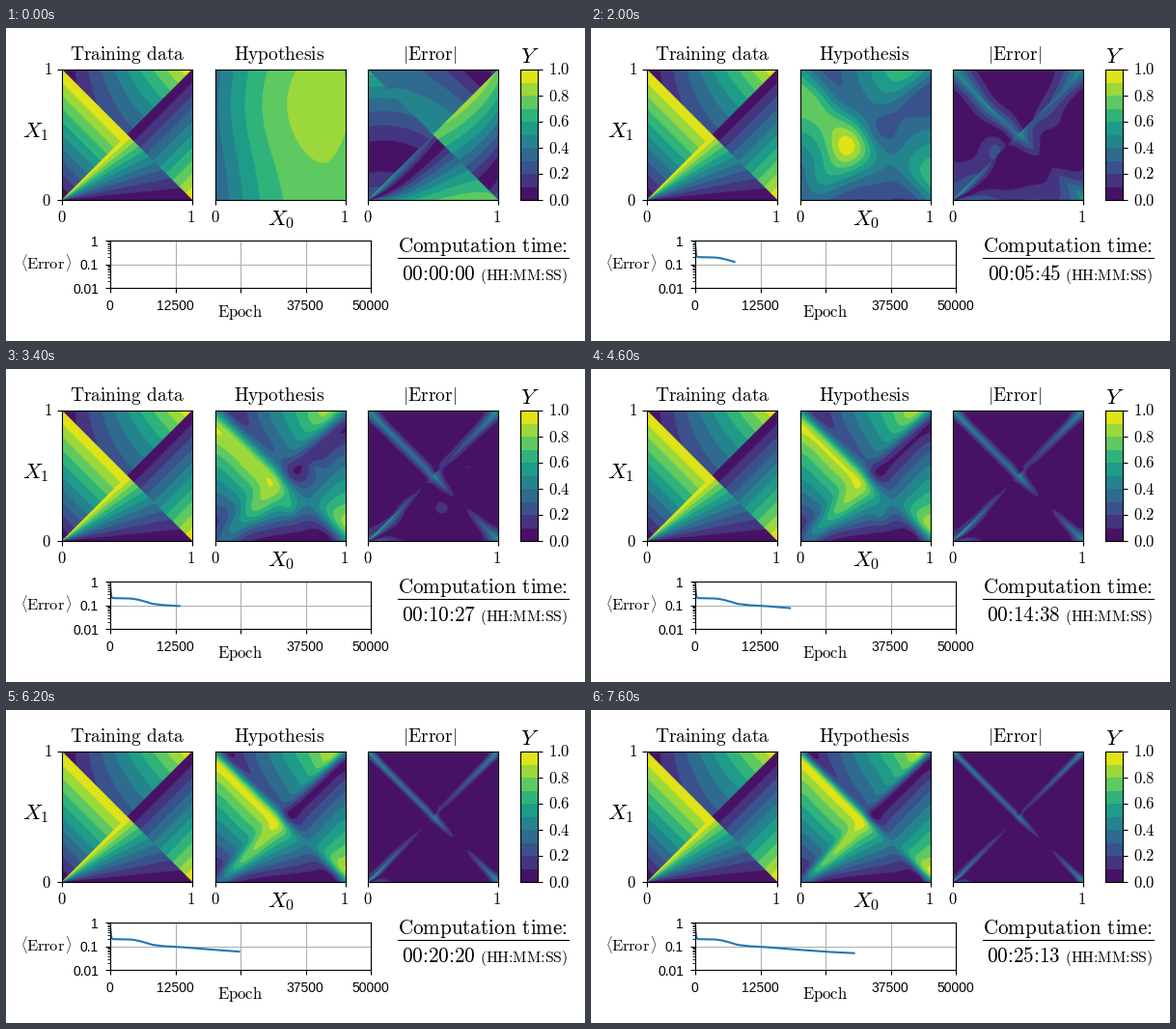
Write a matplotlib script that moves like this. It is 600x324 px and loops after 7.8 s.

```python
import numpy as np
import matplotlib.pyplot as plt
from matplotlib.animation import FuncAnimation
from matplotlib.lines import Line2D

W, H, DPI = 600, 324, 100
FRAMES, STEP = 39, 200
N = 270
SIDE = 135

plt.rcParams["mathtext.fontset"] = "cm"
plt.rcParams["font.family"] = "Liberation Sans"
fig = plt.figure(figsize=(W / DPI, H / DPI), dpi=DPI, facecolor="white")

# ---- fields on the unit square -------------------------------------------
axis = (np.arange(N) + 0.5) / N
u, v = np.meshgrid(axis, axis)
upper, far = v > u, u + v > 1
target = np.select(
    [upper & ~far, ~upper & ~far, ~upper & far],
    [u + v, v / u, u - v],
    u * v,
)


def blur(sigma):
    g = np.exp(-0.5 * ((axis[:, None] - axis) / sigma) ** 2)
    g /= g.sum(axis=1, keepdims=True)
    return g @ target @ g.T


def fit(sigma):
    """Smoothed target with a slight overshoot at the ridges."""
    return 1.5 * blur(sigma) - 0.5 * blur(1.8 * sigma)


def bump(amp, x, y, sx, sy=None):
    return amp * np.exp(-((u - x) / sx) ** 2 - ((v - y) / (sy or sx)) ** 2)


def initial_guess():
    du = u - 0.83
    slope = np.where(du > 0, 1.4, 0.7)
    return 0.855 - slope * du ** 2 - 0.1 * (1 - np.exp(-((v - 0.73) / 0.5) ** 2))


start = initial_guess()
plateau = 0.36 + bump(0.39, 0.12, 0.48, 0.42) - bump(0.12, 0.95, 0, 0.35, 0.2)
rough = (
    blur(0.085)
    + bump(0.2, 0.34, 0.40, 0.14)
    - bump(0.08, 0.28, 0.72, 0.14)
    + bump(0.09, 0.78, 0.6, 0.15)
    + bump(0.1, 0.65, 0, 0.2)
    + bump(0.08, 0.12, 0.2, 0.15)
)
finer = (
    fit(0.055)
    + bump(0.14, 0.57, 0.25, 0.07)
    + bump(0.12, 0.76, 0.57, 0.06)
    - bump(0.1, 0.2, 0.16, 0.1)
)
fine = fit(0.046) + bump(0.1, 0.62, 0.2, 0.06) - bump(0.07, 0.2, 0.16, 0.1)

KEYS = [0, 1, 6, 10, 17, 23, 31, 38]
FIELDS = [start, 0.3 * start + 0.7 * plateau, plateau, rough, finer, fine,
          fit(0.036), fit(0.029)]
SECONDS = [0, 4, 188, 345, 627, 878, 1220, 1513]


def hypothesis(i):
    k = min(np.searchsorted(KEYS, i, side="right") - 1, len(KEYS) - 2)
    w = (i - KEYS[k]) / (KEYS[k + 1] - KEYS[k])
    return np.clip((1 - w) * FIELDS[k] + w * FIELDS[k + 1], 0, 1)


palette = plt.get_cmap("viridis")((np.arange(10) + 0.5) / 10)


def paint(field):
    return palette[np.clip((field * 10).astype(int), 0, 9)]


# ---- error curve ----------------------------------------------------------
CURVE_X = [0, 150, 400, 3500, 4500, 5500, 6500, 8000, 10000, 13300, 18300,
           25000, 30700]
CURVE_Y = [0.5, 0.24, 0.205, 0.2, 0.19, 0.172, 0.15, 0.118, 0.104, 0.095,
           0.077, 0.06, 0.052]


def curve(i):
    epochs = np.linspace(0, max(0, 820 * (i - 0.9)), 300)
    return epochs, np.exp(np.interp(epochs, CURVE_X, np.log(CURVE_Y)))


# ---- layout in pixels -----------------------------------------------------
def axes(x, y, w, h):
    return fig.add_axes([x / W, 1 - (y + h) / H, w / W, h / H])


def label(x, y, s, size, ha="center"):
    return fig.text(x / W, 1 - y / H, s, fontsize=size, ha=ha, va="baseline")


def roman(s):
    return r"$\text{%s}$" % s


def panel(x, title, title_x, field):
    ax = axes(x, 43, SIDE, SIDE)
    im = ax.imshow(paint(field), origin="lower", extent=(0, 1, 0, 1),
                   aspect="auto")
    ax.set_xticks([0, 1], ["", ""])
    ax.set_yticks([])
    label(title_x, 33, roman(title), 14)
    label(x, 201, "$0$", 12)
    label(x + 133.5, 201, "$1$", 12)
    return ax, im


left, _ = panel(58.3, "Training data", 126.3, target)
_, guess_im = panel(216.5, "Hypothesis", 283.5, start)
_, error_im = panel(375.1, "|Error|", 439.5, abs(target - start))
left.set_yticks([0, 1], ["", ""])

label(47.5, 48.5, "$1$", 12, "right")
label(47, 184, "$0$", 12, "right")
label(31, 113, "$X_1$", 16.5)
label(285, 204, "$X_0$", 16.5)
label(542.5, 35.5, "$Y$", 16.5)

bar = axes(533.3, 43, 18, SIDE)
bar.imshow(palette[:, None], origin="lower", extent=(0, 1, 0, 1),
           aspect="auto", interpolation="nearest")
bar.set_xticks([])
bar.yaxis.tick_right()
bar.set_yticks(np.arange(6) / 5, [""] * 6)
for k in range(6):
    label(562.5, 183.5 - SIDE / 5 * k, f"${k / 5:.1f}$", 12, "left")

plot = axes(108.3, 220.3, 270, 49)
plot.set_yscale("log")
plot.set_xlim(0, 50000)
plot.set_ylim(0.01, 1)
plot.set_xticks(np.arange(5) * 12500, [""] * 5)
plot.set_yticks([0.01, 0.1, 1], [""] * 3)
plot.grid(True, which="major", color="#b0b0b0", lw=0.8)
plot.set_axisbelow(True)
line, = plot.plot([], [], color="#1f77b4", lw=1.5)

for epoch in (0, 12500, 37500, 50000):
    label(107.7 + epoch * 270 / 50000, 292, str(epoch), 10)
for s, y in (("1", 226), ("0.1", 250), ("0.01", 275)):
    label(96, y, s, 10, "right")
label(243, 298.5, roman("Epoch"), 12)
label(41.5, 249, roman("Error"), 11.8)
label(19, 249, r"$\langle$", 10)
label(64.5, 249, r"$\rangle$", 10)

label(581.5, 232, roman("Computation time:"), 15.2, "right")
fig.add_artist(Line2D([406 / W, 583 / W], [1 - 237.5 / H] * 2, color="black",
                      lw=0.8))
clock = label(487, 261, roman("00:00:00"), 15.3, "right")
label(582.5, 261, roman("(HH:MM:SS)"), 11.3, "right")


def draw(i):
    guess = hypothesis(i)
    guess_im.set_data(paint(guess))
    error_im.set_data(paint(abs(target - guess)))
    line.set_data(*curve(i))
    s = int(round(np.interp(i, KEYS, SECONDS)))
    clock.set_text(roman(f"{s // 3600:02d}:{s // 60 % 60:02d}:{s % 60:02d}"))
    return guess_im, error_im, line, clock


anim = FuncAnimation(fig, draw, frames=FRAMES, interval=STEP, repeat=True,
                     repeat_delay=0, blit=False)
plt.show()
```
